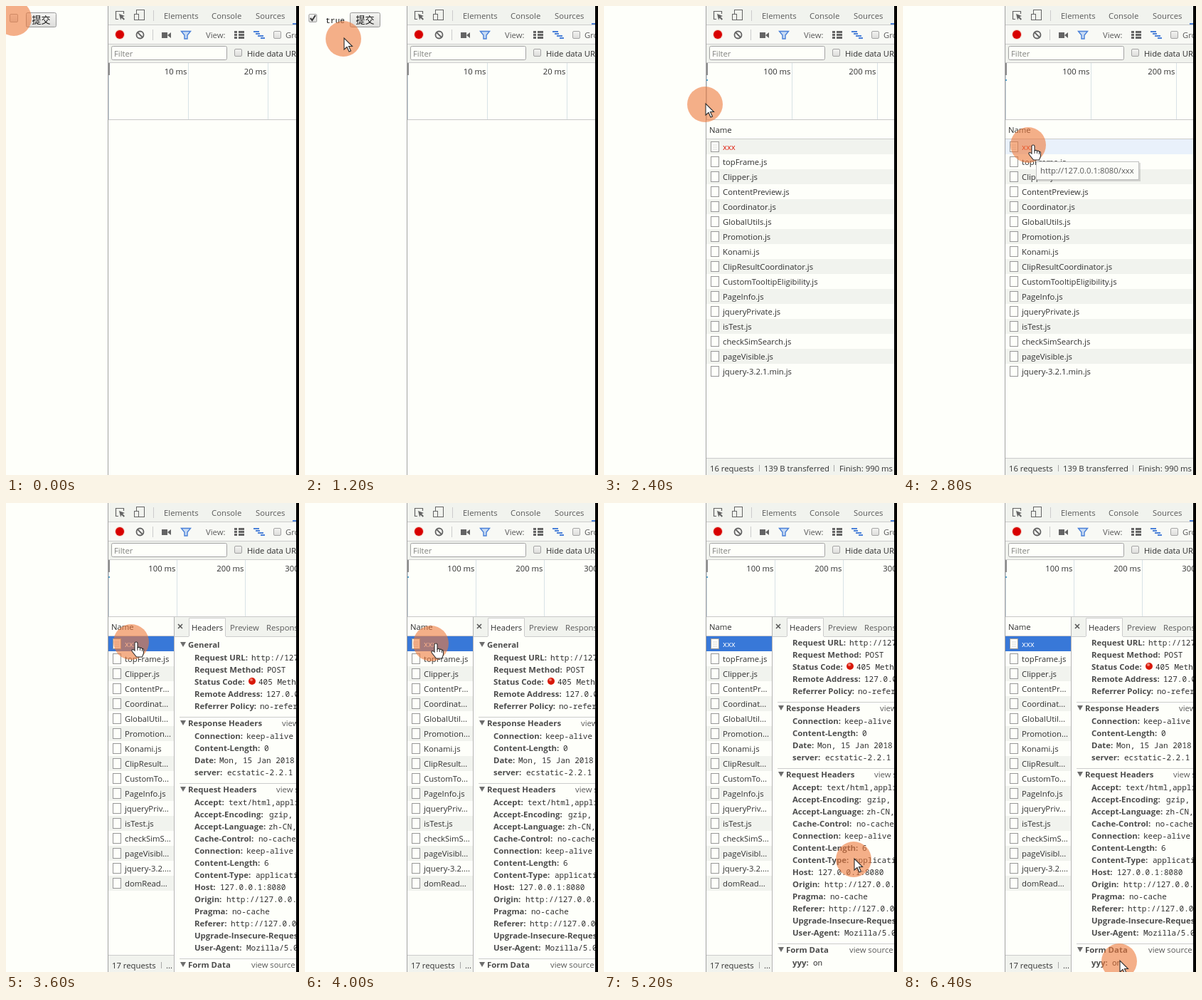
Write an HTML page that moves like this. It is 412 by 658 pixels and loops after 6600 ms.

```html
<!DOCTYPE html>
<html lang="en">
<head>
<meta charset="utf-8">
<title>Form request in developer tools</title>
<style>
html, body { margin: 0; width: 100%; height: 100%; overflow: hidden; background: #fefffa; }
svg { display: block; width: 412px; height: 658px; }
text { font: 11.3px "Open Sans", "Noto Sans", sans-serif; fill: #303030; white-space: pre; }
.dim { fill: #5a5a5a; }
.bold { font-weight: 700; font-size: 11.4px; fill: #4c4c4c; }
.mono { font: 11px "Noto Sans Mono", "DejaVu Sans Mono", monospace; fill: #303030; }
.page { font: 11.2px "Liberation Mono", monospace; fill: #111; }
.cjk { font: 13px "Noto Sans CJK SC", "Noto Sans CJK", sans-serif; fill: #111; }
</style>
</head>
<body>
<svg id="stage" viewBox="0 0 412 658" xmlns="http://www.w3.org/2000/svg"></svg>
<script>
const LOOP = 6600, STEP = 200;
const BAR = '#f1f3ee', PAPER = '#fefffa', LINE = '#cccccc', BLUE = '#4a80d8', INK = '#646464';

// Steps at which the state changes
const AT = { pointer: 1, checked: 2, sent: 9, blank: 11, loaded: 12, hover: 13, tip: 14, open: 18, leave: 22, scrolled: 25 };

// Pointer path: step, x, y
const PATH = [
  [0, 11, 17], [4, 11, 17], [6, 54, 46], [8, 74, 24], [10, 74, 24], [13, 176, 195], [18, 176, 195],
  [20, 177, 197], [21, 177, 197], [22, 203, 242], [25, 340, 480], [26, 351, 500], [31, 307, 634], [32, 304, 643]
];

// The bar marks where a name is cut once the details open
const FILES = ['xxx', 'topFrame.js', 'Clipper.js', 'ContentPr|eview.js', 'Coordinat|or.js', 'GlobalUtil|s.js',
  'Promotion|.js', 'Konami.js', 'ClipResult|Coordinator.js', 'CustomTo|oltipEligibility.js', 'PageInfo.js',
  'jqueryPriv|ate.js', 'isTest.js', 'checkSimS|earch.js', 'pageVisibl|e.js', 'jquery-3.2.|1.min.js', 'domRead|y.js'];

const SECTIONS = [
  { y: 203, title: 'General', rows: [
    ['Request URL', 345, 'http://127.0.0.1'], ['Request Method', 367, 'POST'], ['Status Code', 355, '405 Method'],
    ['Remote Address', 366, '127.0.0.1'], ['Referrer Policy', 357, 'no-referrer']] },
  { y: 313, title: 'Response Headers', link: [388, 'view source'], rows: [
    ['Connection', 338, 'keep-alive'], ['Content-Length', 363, '0'], ['Date', 300, 'Mon, 15 Jan 2018'],
    ['server', 311, 'ecstatic-2.2.1']] },
  { y: 406, title: 'Request Headers', link: [380, 'view source'], rows: [
    ['Accept', 313, 'text/html,application'], ['Accept-Encoding', 370, 'gzip, deflate'], ['Accept-Language', 369, 'zh-CN,zh'],
    ['Cache-Control', 355, 'no-cache'], ['Connection', 338, 'keep-alive'], ['Content-Length', 363, '6'],
    ['Content-Type', 351, 'application'], ['Host', 301, '127.0.0.1:8080'], ['Origin', 310, 'http://127.0.0.1'],
    ['Pragma', 318, 'no-cache'], ['Referer', 316, 'http://127.0.0.1'], ['Upgrade-Insecure-Requests', 420, '1'],
    ['User-Agent', 338, 'Mozilla/5.0']] },
  { y: 652, title: 'Form Data', link: [345, 'view source'], rows: [['yyy', 294, 'on']] }
];

const rect = (x, y, w, h, fill, more = '') => `<rect x="${x}" y="${y}" width="${w}" height="${h}" fill="${fill}" ${more}/>`;
const box = (x, y, w, h, fill, line, more = '') => rect(x + .5, y + .5, w - 1, h - 1, fill, `stroke="${line}" ${more}`);
const text = (x, y, s, cls = '', more = '') => `<text x="${x}" y="${y}" class="${cls}" ${more}>${s}</text>`;
const path = (d, fill, line = 'none', w = 1) => `<path d="${d}" fill="${fill}" stroke="${line}" stroke-width="${w}"/>`;
const dot = (x, y, r, fill, more = '') => `<circle cx="${x}" cy="${y}" r="${r}" fill="${fill}" ${more}/>`;
const check = (x, y, size = 11) => box(x, y, size, size, 'url(#face)', '#a4a4a4', 'rx="1.5"');

const defs = `<defs>
  <linearGradient id="face" x2="0" y2="1"><stop stop-color="#f4f4f2"/><stop offset="1" stop-color="#dcdcda"/></linearGradient>
  <clipPath id="detail"><rect x="237" y="188" width="171" height="470"/></clipPath>
</defs>`;

function page(s) {
  if (s >= AT.blank) return '';
  const on = s >= AT.checked, x = on ? 63 : 28;
  return check(5, 11, 12)
    + (on ? path('M7.5 17l2.6 3 4.6-7', 'none', '#3c3c3c', 2) + text(29, 24, 'true', 'page') : '')
    + box(x, 9, 43, 21, 'url(#face)', '#989898', 'rx="2"')
    + text(x + 8.5, 24, '提交', 'cjk');
}

function toolbar() {
  return rect(144, 0, 264, 79, BAR) + rect(144, 27, 264, 26, '#f8f9f5')
    + [26, 53, 79].map(y => rect(144, y, 264, 1, LINE)).join('')
    + path('M165.5 11V7.5H154.5V18.5H158', 'none', INK, 1.2) + path('M159 11l8 3-3 1.3 3 3-1.5 1.5-3-3-1.3 3z', INK)
    + box(183, 5, 12, 15, 'none', INK) + box(180, 11, 7, 9, BAR, INK)
    + rect(207, 6, 1, 15, LINE) + rect(206, 33, 1, 15, LINE)
    + text(222, 18, 'Elements', 'dim') + text(289, 18, 'Console', 'dim') + text(351, 18, 'Sources', 'dim')
    + rect(403, 24, 5, 2, BLUE)
    + dot(160, 40, 7, '#f0a090', 'opacity=".5"') + dot(160, 40, 6, '#d80000')
    + dot(188.5, 40.5, 5, 'none', `stroke="${INK}" stroke-width="1.8"`) + path('M185 37l7 7', 'none', INK, 1.8)
    + rect(219, 37, 8, 8, INK) + path('M227 41l5-4v8z', INK)
    + path('M246.5 35.5h13l-4.5 5.5v5h-4v-5z', '#c9dcf4', BLUE, 1.4)
    + text(281, 45, 'View:', 'dim')
    + [35, 39, 43].map(y => rect(321, y, 4, 3, INK) + rect(327, y, 8, 3, INK)).join('')
    + [[348, 35, 8], [351, 38, 6], [354, 41, 8], [358, 44, 6]].map(([x, y, w]) => rect(x, y, w, 2, BLUE)).join('')
    + check(376, 35) + text(393, 45, 'Group', 'dim')
    + box(148, 56, 163, 20, PAPER, '#a3a3a3', 'rx="2"') + text(152, 71, 'Filter', '', 'fill-opacity=".6"')
    + check(321, 60) + text(339, 71, 'Hide data URLs');
}

function timeline(s) {
  const [gap, unit] = s >= AT.open ? [96, 100] : s >= AT.loaded ? [120, 100] : [112, 10];
  let out = rect(144, 159, 264, 1, '#c8c8c8') + rect(144, 80, 1, 79, '#c4d0d8') + rect(144, 80, 2, 17, '#8c8c8c');
  for (let i = 1; i < 4; i++) {
    const x = 144 + gap * i;
    out += rect(x, 80, 1, 79, '#d8e2e6') + text(x - 1.5, 96, unit * i + ' ms', '', 'text-anchor="end"');
  }
  return out + (s >= AT.loaded ? rect(144, 103, 2, 2, '#50a0c8') : '');
}

function fileRow(name, i, s) {
  const y = 187 + 21 * i, open = s >= AT.open, first = i === 0;
  const picked = first && open, hover = first && !open && s >= AT.hover;
  const back = picked ? '#3878d8' : hover ? '#e9f1fb' : i % 2 ? PAPER : BAR;
  const [head, tail = ''] = name.split('|');
  const label = open && tail ? head + '...' : head + tail;
  const ink = picked ? '#fff' : first ? '#e02010' : '#303030';
  return rect(144, y, 264, 21, back)
    + box(150, y + 3, 12, 15, PAPER, '#989898')
    + (first ? path(`M153 ${y + 8}h6m-6 3h6m-6 3h6`, 'none', '#dcdcdc') : '')
    + text(167, y + 15, label, '', `style="fill:${ink}"`);
}

function requests(s) {
  if (s < AT.sent) return '';
  const count = s >= AT.open ? 17 : s >= AT.loaded ? 16 : 1;
  const sep = x => rect(x, 644, 1, 9, '#a8a8a8');
  const out = rect(144, 160, 264, 26, PAPER) + rect(144, 186, 264, 1, LINE) + text(148, 178, 'Name')
    + FILES.slice(0, count).map((name, i) => fileRow(name, i, s)).join('')
    + rect(144, 634, 264, 24, BAR) + rect(144, 634, 264, 1, LINE)
    + text(149, 653, count + ' requests');
  if (count === 1) return out + sep(210) + text(219, 653, '139 B transferred');
  return out + sep(218) + (count === 17 ? text(225, 653, '...')
    : text(225, 653, '139 B transferred') + sep(323) + text(331, 653, 'Finish: 990 ms'));
}

function section({ y, title, link, rows }, i) {
  return (i ? rect(244, y - 13, 164, 1, LINE) : '')
    + path(`M245 ${y - 8}h8l-4 7z`, '#6c6c6c') + text(256, y, title, 'bold')
    + (link ? text(link[0], y, link[1], 'dim') : '')
    + rows.map(([key, x, value], n) => {
      const base = y + 18 + 17 * n;
      return text(265, base, key + ':', 'bold') + text(x, base, value, 'mono')
        + (key === 'Status Code' ? dot(346, base - 5, 5, '#d81808') + dot(345, base - 7, 2, '#f08070') : '');
    }).join('');
}

function details(s) {
  if (s < AT.open) return '';
  const shift = s >= AT.scrolled ? -21 : 0;
  return rect(236, 160, 172, 498, PAPER) + rect(236, 160, 172, 27, BAR) + rect(236, 187, 172, 1, LINE)
    + rect(257, 161, 52, 27, PAPER) + path('M257.5 187V161.5H308.5V187', 'none', LINE)
    + path('M242 170l6 6m0-6l-6 6', 'none', '#555', 1.5)
    + text(261, 179, 'Headers') + text(315, 179, 'Preview', 'dim') + text(366, 179, 'Response', 'dim')
    + `<g clip-path="url(#detail)"><g transform="translate(0 ${shift})">${SECTIONS.map(section).join('')}</g></g>`
    + rect(236, 160, 1, 498, '#b4b4b4');
}

function tooltip(s) {
  if (s < AT.tip || s >= AT.open) return '';
  return rect(189, 220, 145, 26, '#808080', 'opacity=".3"')
    + box(187, 218, 145, 26, '#fbfcf8', '#c0c0c0') + text(193, 235, 'http://127.0.0.1:8080/xxx', 'dim');
}

function pointer(s) {
  const n = Math.max(1, PATH.findIndex(p => p[0] >= s));
  const [a, x0, y0] = PATH[n - 1], [b, x1, y1] = PATH[n];
  const k = (s - a) / (b - a), x = x0 + (x1 - x0) * k, y = y0 + (y1 - y0) * k;
  const arrow = 'M0 0V16L4 12.5 7 19 9.5 18 6.5 11.5H11.5z';
  const hand = 'M5 12V2Q5 0 7 0T9 2V8Q11 6.5 12.5 8.5 14.5 7.5 15.5 9.5 17.5 9 17.5 11.5V16L15.5 21H7.5L1.5 13.5Q0 11 2 10.5 3.5 10.5 5 12z';
  const onHand = s >= AT.hover && s < AT.leave;
  const spot = dot(x, y, 25, '#ee7a3c', 'opacity=".6"');
  if (s < AT.pointer) return spot;
  return spot + `<g transform="translate(${onHand ? x : x + 1} ${onHand ? y : y - 1})">${path(onHand ? hand : arrow, '#fff', '#2c2c2c', 1.1)}`
    + (onHand ? path('M9 8v4m3.5-3v3m3-2v3', 'none', '#2c2c2c') : '') + '</g>';
}

const stage = document.getElementById('stage');
let shown = -1;

function draw(s) {
  stage.innerHTML = defs + rect(0, 0, 412, 658, PAPER) + page(s) + toolbar() + timeline(s) + requests(s) + details(s)
    + rect(143, 0, 1, 658, '#a3a3a3') + tooltip(s) + pointer(s) + rect(408, 0, 4, 658, '#000');
}

function tick() {
  const s = Math.floor(performance.now() % LOOP / STEP);
  if (s !== shown) draw(shown = s);
  requestAnimationFrame(tick);
}
tick();
</script>
</body>
</html>
```
